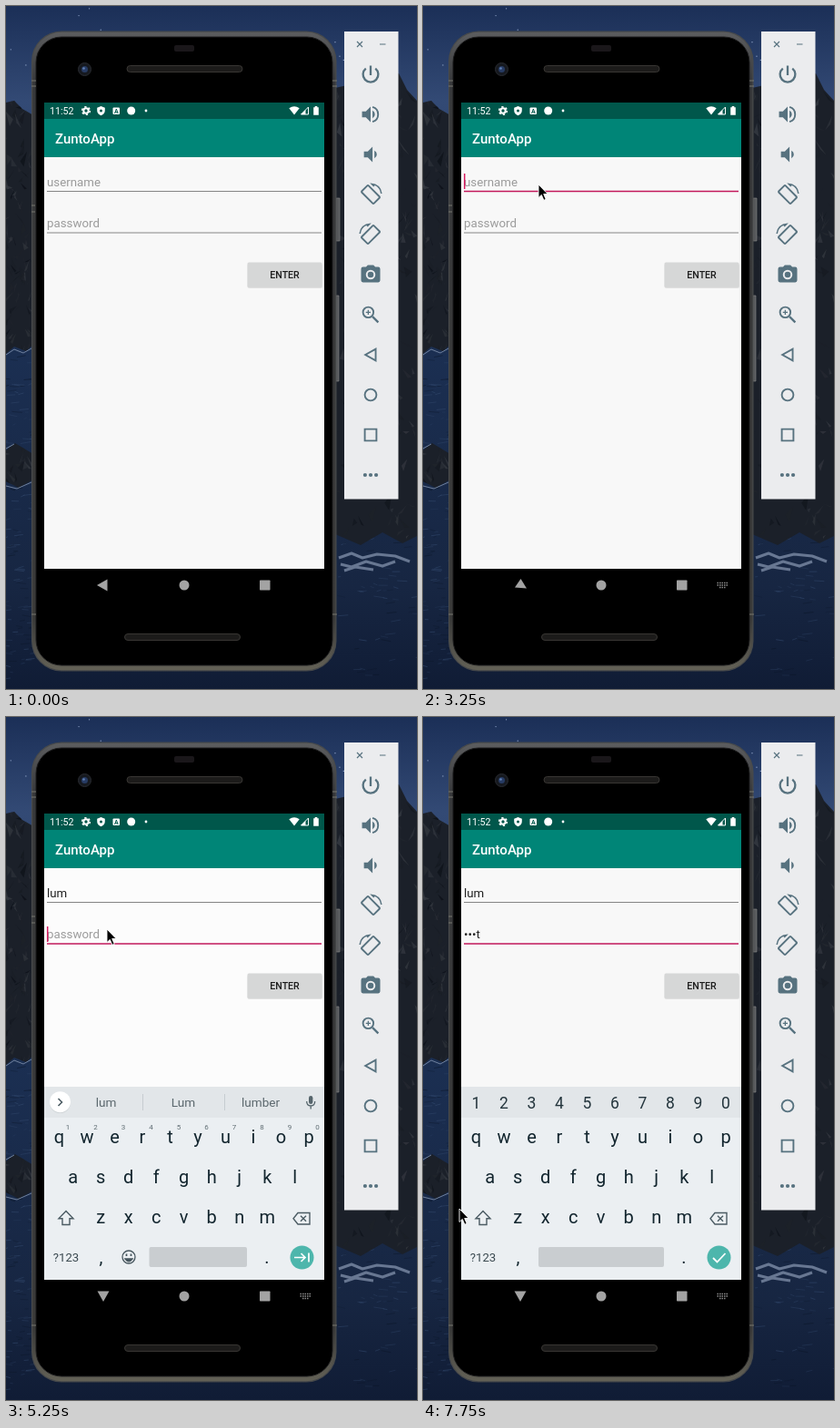
These frames come from a looping animation (452 px wide and 750 px high, 8 s). An HTML page:

```html
<!DOCTYPE html>
<html lang="en">
<head>
<meta charset="utf-8">
<title>Login demo</title>
<style>
html, body { margin: 0; width: 100%; height: 100%; overflow: hidden; background: #12213f; }
svg { display: block; width: 452px; height: 750px; font-family: Roboto, "Noto Sans", sans-serif; }
.mid { text-anchor: middle; }
.line { fill: none; stroke: #57727f; stroke-width: 1.8; }
.key { font-size: 20px; fill: #12252e; }
.num { font-size: 17.5px; fill: #24353d; }
.sup { font-size: 8px; fill: #5f6c72; }
.word { font-size: 13.6px; fill: #5c686e; }
.field { font-size: 13.3px; }
</style>
</head>
<body>
<svg viewBox="0 0 452 750">
  <defs>
    <linearGradient id="sky" x2="0" y2="1">
      <stop offset="0" stop-color="#1b2f57"/><stop offset=".14" stop-color="#334a75"/>
      <stop offset=".5" stop-color="#1b2f52"/><stop offset=".85" stop-color="#172642"/>
      <stop offset="1" stop-color="#101c35"/>
    </linearGradient>
    <linearGradient id="metal" x2="0" y2="1">
      <stop offset="0" stop-color="#5c5d5f"/><stop offset=".08" stop-color="#37383a"/>
      <stop offset=".92" stop-color="#3a3a39"/><stop offset="1" stop-color="#636156"/>
    </linearGradient>
    <path id="land" d="M0 106L9 104 18 113 30 120V372L22 379 9 374 0 382ZM0 488L10 480 30 492V520L14 529 0 522ZM362 90L432 74 441 92 452 104V582L436 590 414 578 390 592 362 580Z"/>
    <clipPath id="rock"><use href="#land"/></clipPath>
  </defs>

  <rect width="452" height="750" fill="url(#sky)"/>
  <g id="waves"/>
  <use href="#land" fill="#1b2029"/>
  <g id="facets" clip-path="url(#rock)"/>
  <g fill="none" stroke="#a9b9d2" stroke-linejoin="round">
    <path d="M366 606l14-5 12 5 16-4 20 2 16 6M368 613l12 3 16-6 18 5 14-5M372 620l12-4 20 3" stroke-width="3" opacity=".55"/>
    <path d="M0 383l9-6 10 4 9-5M0 527l12 3 16-7M0 486l9-5" opacity=".6"/>
  </g>

  <!-- phone -->
  <path d="M363 211h4v47h-4zM363 318h3v94h-3z" fill="#55575a" stroke="#8b8c8c" stroke-width=".6"/>
  <rect x="28" y="27.500" width="335.500" height="703" rx="33" fill="#484a4b"/>
  <rect x="29.200" y="28.700" width="333.100" height="700.600" rx="32" fill="url(#metal)"/>
  <rect x="33" y="34" width="326" height="690" rx="28" fill="#000" stroke="#1d1d1e"/>
  <path d="M28 82h5M28 88h5M359 82h5M359 88h5M28 219h4M28 226h4M28 668h5M359 668h5" stroke="#77776f" stroke-width="1"/>
  <rect x="185" y="43" width="22" height="7" rx="2" fill="#1a171a"/>
  <circle cx="86.500" cy="69.500" r="7" fill="#16191f" stroke="#292b30"/>
  <circle cx="86.500" cy="69.500" r="3.500" fill="#273b63"/>
  <circle cx="85.500" cy="68.500" r="1.300" fill="#6181b5"/>
  <g fill="#1c1b1a" stroke="#383633">
    <rect x="133" y="65.500" width="127" height="7" rx="3.500"/>
    <rect x="130.500" y="689.500" width="127" height="7" rx="3.500"/>
  </g>

  <!-- screen -->
  <rect id="page" x="42" y="106" width="308" height="512"/>
  <rect x="42" y="106" width="308" height="18" fill="#00574b"/>
  <rect x="42" y="124" width="308" height="42" fill="#008577"/>
  <g fill="#fff">
    <text x="48" y="119" font-size="10.700">11:52</text>
    <text x="54" y="151" font-size="15" font-weight="500">ZuntoApp</text>
    <circle cx="88" cy="115" r="2.700" fill="none" stroke="#fff" stroke-width="2"/>
    <circle cx="88" cy="115" r="4.300" fill="none" stroke="#fff" stroke-width="1.600" stroke-dasharray="2.250"/>
    <path d="M104.500 110l4.300 1.700v3q0 3.600-4.300 5.500-4.300-1.900-4.300-5.500v-3z"/>
    <circle cx="104.500" cy="115" r="1.500" fill="#00574b"/>
    <rect x="117.500" y="111.500" width="7.500" height="7.500" rx="1"/>
    <text x="121.250" y="118" class="mid" font-size="7" font-weight="700" fill="#00574b">A</text>
    <circle cx="137.700" cy="115" r="4.500"/>
    <circle cx="154" cy="115" r="1.400"/>
    <path d="M311.300 112.300q5.700-4.200 11.400 0L317 119.500z"/>
    <path d="M324.500 119l8-8v8z" fill="none" stroke="#fff"/><path d="M324.500 119l5-5v5z"/>
    <path d="M338.200 111.200h1.500v-1.200h2.600v1.200h1.500v8.500h-5.600z"/>
  </g>
  <text id="user" class="field" x="45" y="197.500"></text>
  <text id="pass" class="field" x="45" y="243"></text>
  <path id="compose" stroke="#333" stroke-width=".8"/>
  <path id="userLine" d="M45 203.500H347"/>
  <path id="passLine" d="M45 249H347"/>
  <path id="caret" stroke="#d81b60" stroke-width="1.500"/>
  <rect x="265.500" y="283" width="82.500" height="27" rx="2" fill="#c9c9c9" opacity=".5"/>
  <rect x="265.500" y="281.500" width="82" height="27.500" rx="1.500" fill="#d6d7d7"/>
  <text x="306.500" y="299" class="mid" font-size="10.600" font-weight="500" fill="#1c1c1c">ENTER</text>

  <g id="keyboard">
    <rect x="42" y="406" width="308" height="212" fill="#ebeff2"/>
    <rect x="42" y="406" width="308" height="34" fill="#e2e6e9"/>
    <g id="letters" class="mid"></g>
    <g fill="none" stroke="#4b5b63" stroke-width="1.400">
      <path d="M66 542.500l8 8.300h-4v6.700h-8v-6.700h-4z"/>
      <path d="M321 544.500h13v12.500h-13l-5-6.250zM324 547.700l6 6m0-6l-6 6"/>
    </g>
    <text x="66" y="598" class="mid" font-size="13.200" fill="#39484f">?123</text>
    <text x="104.500" y="600" class="mid key">,</text>
    <text x="287" y="600" class="mid key">.</text>
    <circle cx="325.500" cy="593.500" r="13" fill="#4db6ac"/>
    <g id="textMode">
      <rect x="157.500" y="582" width="107.500" height="22" rx="2" fill="#c9cdd0"/>
      <g fill="none" stroke="#46565e" stroke-width="1.300">
        <circle cx="135" cy="593" r="7"/><path d="M131 595q4 5.500 8 0z" fill="#46565e"/>
        <path d="M132.500 589.500v2.500M137.500 589.500v2.500" stroke-width="1.700"/>
      </g>
      <path d="M317 593.500h12m-4.500-4.500l4.500 4.500-4.500 4.500M333 588.500v10" fill="none" stroke="#fff" stroke-width="1.700"/>
      <circle cx="59.500" cy="423.500" r="11.500" fill="#cfd4d7"/>
      <circle cx="59.500" cy="422.700" r="11.500" fill="#fff"/>
      <path d="M57.500 419l4 4-4 4" fill="none" stroke="#46565e" stroke-width="1.500"/>
      <path id="dividers" d="M150.500 414v18M240.500 414v18" stroke="#c6ccd0"/>
      <g id="words" class="mid word"><text x="110" y="428"/><text x="195" y="428"/><text x="280" y="428"/></g>
      <rect x="333" y="416" width="4.400" height="9" rx="2.200" fill="#55646b"/>
      <path d="M330.700 422q0 5 4.500 5t4.500-5M335.200 427v3.500" fill="none" stroke="#55646b" stroke-width="1.300"/>
    </g>
    <g id="passMode">
      <rect x="127" y="582" width="138" height="22" rx="2" fill="#c9cdd0"/>
      <g id="digits" class="mid num"></g>
      <path d="M319 594l4.500 4.500 9-9.500" fill="none" stroke="#fff" stroke-width="1.800"/>
    </g>
  </g>

  <!-- navigation bar -->
  <g fill="#a3a3a3">
    <path id="back"/>
    <circle cx="196" cy="636" r="5.500"/>
    <rect x="279" y="630.500" width="11.500" height="11" rx=".7"/>
    <path id="dots" d="M323.500 633.500h12M323.500 636h12M326 638.500h7" stroke="#8c8c8c" stroke-width="1.300" stroke-dasharray="1.500 1"/>
  </g>

  <!-- emulator toolbar -->
  <rect x="372" y="28" width="59.500" height="513.500" fill="#ebecee"/>
  <path d="M386 39l6 6m0-6l-6 6M411 42h6.500" class="line" style="stroke-width:1.200"/>
  <g id="tools" fill="#57727f"></g>
  <path id="cursor" d="M0 0V14.500L3.300 11.400 5.900 17.300 8.200 16.300 5.700 10.500H10.200Z" fill="#000" stroke="#fff" stroke-width=".9"/>
</svg>
<script>
const $ = id => document.getElementById(id);
const label = (x, y, cls, s) => `<text x="${x}" y="${y}" class="${cls}">${s}</text>`;
const row = (chars, x, y, cls) => [...chars].map((c, i) => label(x + i * 30.5, y, cls, c)).join('');

$('letters').innerHTML = row('qwertyuiop', 58.5, 468, 'key') + row('asdfghjkl', 73.7, 512, 'key') +
  row('zxcvbnm', 104.2, 556, 'key') + `<g id="sups">${row('1234567890', 68, 453, 'sup')}</g>`;
$('digits').innerHTML = row('1234567890', 58.5, 430, 'num');

const rotate = '<rect class="line" x="7" y="3" width="10" height="18" rx="1" transform="rotate(-45 12 12)"/><path d="M16.500 2.500q5.300 2.700 6 8.500H24Q23 1 12 0h-.7l3.800 3.800z"/>';
const tools = [
  '<path class="line" style="stroke-width:2.200" d="M12 3v10M7 5.900a8 8 0 1 0 10 0"/>',
  '<path d="M3 9v6h4l5 5V4L7 9zM14 8v8q2.500-1.300 2.500-4T14 8z"/><path class="line" d="M14 4.300a8 8 0 0 1 0 15.400"/>',
  '<path d="M5 9v6h4l5 5V4L9 9zM16 8v8q2.500-1.300 2.500-4T16 8z"/>',
  rotate,
  `<g transform="matrix(-1 0 0 1 24 0)">${rotate}</g>`,
  '<path fill-rule="evenodd" d="M9 2L7.200 4H4q-2 0-2 2v12q0 2 2 2h16q2 0 2-2V6q0-2-2-2h-3.200L15 2zM7 12a5 5 0 0 1 10 0 5 5 0 0 1-10 0z"/><circle cx="12" cy="12" r="3.100"/>',
  '<g class="line"><circle cx="9.500" cy="9.500" r="5.500"/><path d="M14 14l6 6" style="stroke-width:2.200"/><path d="M7 9.500h5m-2.500-2.500v5" style="stroke-width:1.200"/></g>',
  '<path class="line" d="M17.300 6v12L6.500 12z"/>',
  '<circle class="line" cx="12" cy="12" r="6.100"/>',
  '<path class="line" d="M5.900 5.900h12.200v12.200H5.900z"/>',
  '<circle cx="6.200" cy="12" r="2"/><circle cx="12" cy="12" r="2"/><circle cx="17.800" cy="12" r="2"/>'
];
$('tools').innerHTML = tools.map((s, i) =>
  `<g transform="translate(388.400 ${62.4 + i * 44}) scale(1.05)">${s}</g>`).join('');

// Seeded texture for rocks, water and stars
let seed = 7;
const rnd = (a, b) => a + (b - a) * ((seed = seed * 16807 % 2147483647) / 2147483647);
const side = i => i % 2 ? rnd(-5, 29) : rnd(364, 452);
let facets = '', waves = '';
for (let i = 0; i < 420; i++) {
  const v = rnd(10, 58);
  facets += `<path d="M${side(i)} ${rnd(75, 590)}l${rnd(-9, 9)} ${rnd(3, 12)} ${rnd(-7, 7)} ${rnd(-4, 8)}z" fill="rgb(${v},${v + 4},${v + 12})" opacity=".7"/>`;
}
for (let i = 0; i < 240; i++)
  waves += `<path d="M${side(i)} ${rnd(385, 740)}l${rnd(3, 12)} ${rnd(-2, 2)}" stroke="${i % 3 ? '#32486c' : '#0c1729'}" opacity="${rnd(.2, .6)}"/>`;
for (let i = 0; i < 14; i++)
  waves += `<circle cx="${rnd(0, 452)}" cy="${rnd(2, 70)}" r=".6" fill="#9fb2d6"/>`;
$('facets').innerHTML = facets;
$('waves').innerHTML = waves;

// [time, x, y]
const moves = [[750, 434, 157], [1000, 350, 160], [1250, 280, 167], [1500, 231, 174], [1750, 156, 179],
  [2500, 143, 187], [2750, 127, 196], [4750, 121, 213], [5000, 111, 233], [7500, 84, 385], [7750, 40, 540]];
const name = 'lum', guesses = ['last', 'luck', 'lumber'];
const typed = ['', 't', '•e', '••s', '•••', '•••t'];

const clamp = (v, max) => Math.max(0, Math.min(max, v));
const show = (id, on) => $(id).style.display = on ? '' : 'none';

function setField(id, text, hint, active) {
  const el = $(id);
  el.textContent = text || hint;
  el.setAttribute('fill', text ? '#202020' : '#9b9b9b');
  const line = $(id + 'Line');
  line.setAttribute('stroke', active ? '#c2185b' : '#858585');
  line.setAttribute('stroke-width', active ? 1.5 : 1);
  return 45 + (text ? el.getComputedTextLength() : 0);
}

function draw(now) {
  const t = Math.floor(now % 8000 / 250) * 250;
  const onUser = t >= 3000 && t < 5250, onPass = t >= 5250;
  const n = clamp((t - 3500) / 250, 3), p = clamp((t - 6000) / 250, 5);
  const userEnd = setField('user', name.slice(0, n), 'username', onUser);
  const passEnd = setField('pass', typed[p], 'password', onPass);

  $('page').setAttribute('fill', t >= 3500 && t < 7750 ? '#fcfcfc' : '#f8f8f8');
  $('compose').setAttribute('d', `M45 199.500H${userEnd}`);
  show('compose', onUser && n);
  $('caret').setAttribute('d', onPass ? `M${passEnd + .7} 230v17` : `M${userEnd + .7} 184v17`);
  show('caret', onUser || onPass && t < 7500 && t !== 5750 && t !== 6000);

  const secret = t >= 5500;
  show('keyboard', t >= 3500);
  show('textMode', !secret);
  show('passMode', secret);
  show('sups', !secret);
  show('dividers', n);
  const part = name.slice(0, n), cap = part.charAt(0).toUpperCase() + part.slice(1);
  const words = n ? [part, cap, guesses[n - 1]] : ['', '', ''];
  [...$('words').children].forEach((el, i) => el.textContent = words[i]);

  $('back').setAttribute('d', t < 3250 ? 'M111.500 629.500v13L100 636z'
    : t < 3500 ? 'M107.500 629L114 639.500 101 638.500z' : 'M100.500 630.500h13L107 642z');
  show('dots', t >= 3250);

  const at = moves.filter(m => m[0] <= t).pop();
  show('cursor', at);
  if (at) $('cursor').setAttribute('transform', `translate(${at[1]} ${at[2]})`);
  requestAnimationFrame(draw);
}
draw(performance.now());
</script>
</body>
</html>
```
